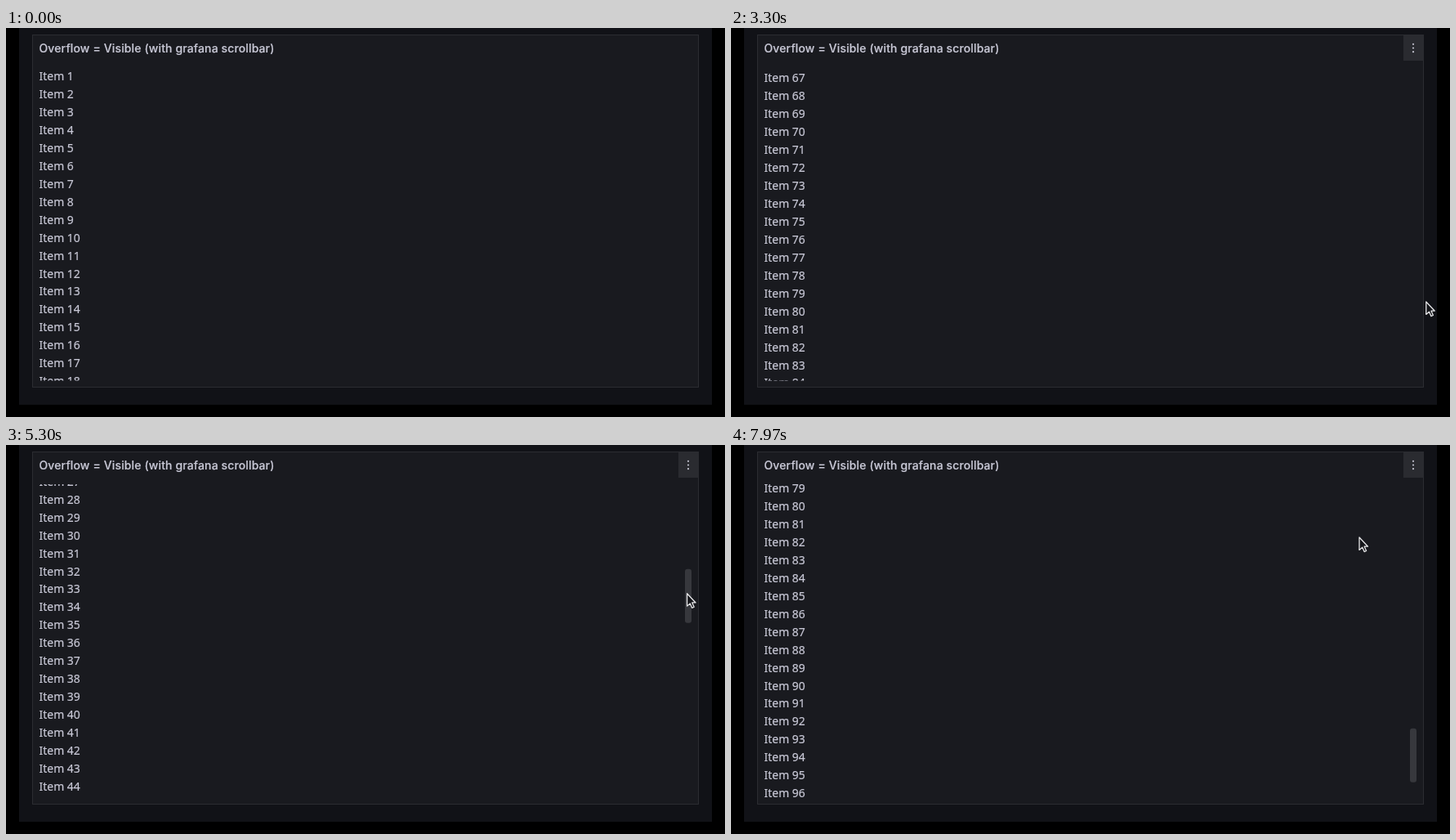
An HTML page with a canvas for the animation above (8 s loop, 880 px wide and 476 px high).

```html
<!DOCTYPE html>
<html lang="en">
<head>
<meta charset="utf-8">
<title>Scrolling panel</title>
<style>
  html, body { margin: 0; width: 100%; height: 100%; overflow: hidden; background: #000; }
  canvas { display: block; }
</style>
</head>
<body>
<canvas id="stage" width="880" height="476"></canvas>
<script>
const ctx = document.getElementById('stage').getContext('2d');
const LOOP = 8000, POINTER_ENTERS = 700, DRAG_ENDS = 6000;
const ITEM_COUNT = 100, ITEM_PITCH = 21.94, FIRST_BASELINE = 64.2;
const VIEW_TOP = 48, VIEW_BOTTOM = 431.5;
const MAX_SCROLL = 1823, MAX_THUMB = 314;

// [time, scroll]: drag down, drag back up, then wheel down
const scrollKeys = [
  [2030, 0], [2870, 1156], [3730, 1666], [4080, MAX_SCROLL],
  [4370, MAX_SCROLL], [4730, 1651], [5740, 0],
  [6570, 0], [7270, 850], [LOOP, 1720],
];

// [start, end, x, y]: pointer moves; while dragging, y is relative to the thumb
const pointerMoves = [
  [0, 1, 168, 372], [700, 1100, 766, 144], [1470, 1870, 837, 86],
  [2030, 3400, 851, 86], [3400, 3730, 830, 86], [4100, 4370, 830, 81],
  [4730, 5740, 836, 81], [5740, 5830, 835, 68],
  [6100, 6400, 781, 107], [6570, 6900, 769, 113],
];

const clamp01 = u => Math.min(1, Math.max(0, u));
const smooth = u => u * u * (3 - 2 * u);
const fade = (t, start) => clamp01((t - start) / 180);
const thumbOffset = scroll => scroll / MAX_SCROLL * MAX_THUMB;

// Monotone cubic interpolation: passes the keys smoothly, without overshoot
function scrollAt(t) {
  const next = scrollKeys.findIndex(key => key[0] > t);
  if (next <= 0) return 0;
  const slope = i => {
    const [a, b] = [scrollKeys[i], scrollKeys[i + 1]];
    return a && b ? (b[1] - a[1]) / (b[0] - a[0]) : 0;
  };
  const tangent = i => {
    const a = slope(i - 1), b = slope(i);
    return a * b > 0 ? 2 * a * b / (a + b) : 0;
  };
  const [[t0, from], [t1, to]] = scrollKeys.slice(next - 1, next + 1);
  const u = (t - t0) / (t1 - t0), v = 1 - u;
  return from + (to - from) * smooth(u)
    + (t1 - t0) * u * v * (v * tangent(next - 1) - u * tangent(next));
}

function pointerAt(t, scroll) {
  let x = 0, y = 0;
  for (const [start, end, toX, toY] of pointerMoves) {
    const u = smooth(clamp01((t - start) / (end - start)));
    x += (toX - x) * u;
    y += (toY - y) * u;
  }
  return [x, y + (t < DRAG_ENDS ? thumbOffset(scroll) : 0)];
}

function box(color, x, y, w, h, radius = 0) {
  ctx.fillStyle = color;
  ctx.beginPath();
  ctx.roundRect(x, y, w, h, radius);
  ctx.fill();
}

function label(text, y) {
  ctx.fillStyle = ctx.strokeStyle = '#c8c8d6';
  ctx.lineWidth = 0.2;
  ctx.fillText(text, 40.5, y);
  ctx.strokeText(text, 40.5, y);
}

function drawPanel() {
  box('#000', 0, 0, 880, 476);
  box('#111217', 16, 0, 848, 461);
  box('#2b2c31', 32, 8, 816, 432);
  box('#191a1f', 33, 9, 814, 430);
  ctx.font = '500 13.96px Inter, sans-serif';
  ctx.letterSpacing = '0.15px';
  label('Overflow = Visible (with grafana scrollbar)', 29.6);
  ctx.letterSpacing = '0px';
}

function drawItems(scroll) {
  ctx.save();
  ctx.beginPath();
  ctx.rect(33, VIEW_TOP, 814, VIEW_BOTTOM - VIEW_TOP);
  ctx.clip();
  ctx.font = '13.96px "Noto Sans", sans-serif';
  for (let i = 0; i < ITEM_COUNT; i++) {
    const y = FIRST_BASELINE + i * ITEM_PITCH - scroll;
    if (y > VIEW_TOP - 6 && y < VIEW_BOTTOM + 16) label(`Item ${i + 1}`, y);
  }
  ctx.restore();
}

function drawMenu() {
  box('#2a2b30', 823, 9, 24, 31);
  for (let i = -1; i <= 1; i++) box('#c4c4d0', 833.9, 23.4 + i * 4.7, 2.2, 2.2, 1.1);
}

function drawThumb(scroll, alpha) {
  ctx.globalAlpha = alpha;
  box('#37383d', 831, 51 + thumbOffset(scroll), 8, 66, 3);
  ctx.globalAlpha = 1;
}

const arrow = new Path2D('M0 0V15.4L3.7 12.2L6.1 17.6L8.6 16.5L6.2 11.2H10.5Z');

function drawPointer([x, y]) {
  ctx.save();
  ctx.translate(x, y);
  ctx.fillStyle = '#15161a';
  ctx.fill(arrow);
  ctx.strokeStyle = '#e6e6e8';
  ctx.lineWidth = 1.3;
  ctx.lineJoin = 'round';
  ctx.stroke(arrow);
  ctx.restore();
}

function render(t) {
  const scroll = scrollAt(t);
  drawPanel();
  drawItems(scroll);
  if (t < POINTER_ENTERS) return;
  drawMenu();
  // The thumb hides while the pointer is outside the list
  drawThumb(scroll, fade(t, POINTER_ENTERS) - fade(t, 2450) + fade(t, 3450));
  drawPointer(pointerAt(t, scroll));
}

const start = performance.now();
function tick() {
  render((performance.now() - start) % LOOP);
  requestAnimationFrame(tick);
}
tick();
</script>
</body>
</html>
```
